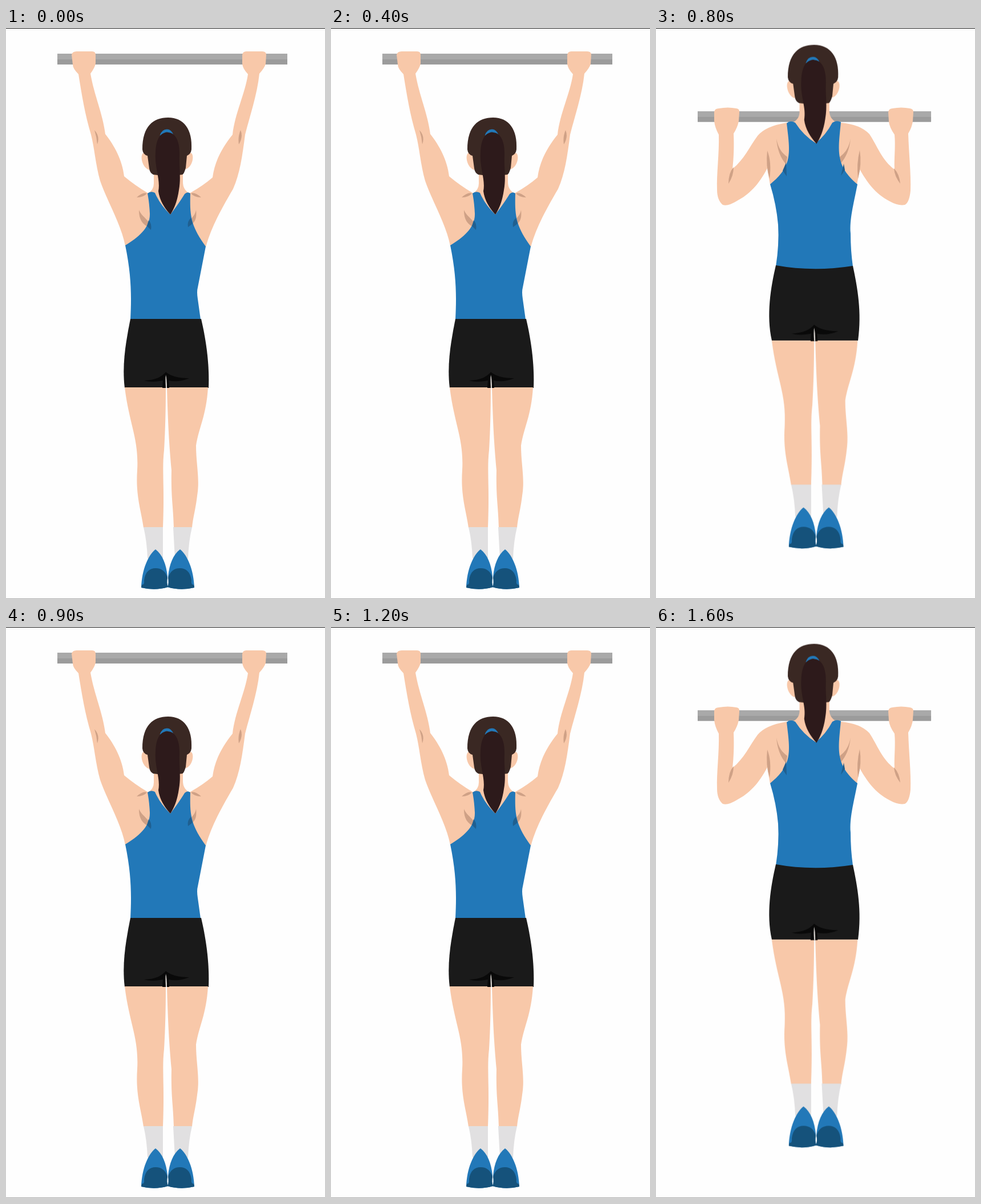
Write an HTML page that moves like this. It is 559x1001 px and loops after 1.7 s.

```html
<!DOCTYPE html>
<html lang="en">
<head>
<meta charset="utf-8">
<title>Pull-up</title>
<style>
  html, body { margin: 0; height: 100%; overflow: hidden; background: #fefefe; }
  svg { display: block; width: 100%; height: 100%; }
  #hang, #pull { filter: blur(.6px); }
  .skin { fill: #f8c8a9; }
  .shade { fill: #cfa186; }
  .blue { fill: #2278b8; }
  .navy { fill: #15527b; }
  .fold { fill: #1f5f90; }
  .shorts { fill: #1a1a1a; }
  .crease { fill: #090909; }
  .sock { fill: #e1e0e1; }
  .hair { fill: #3a2823; }
  .tail { fill: #2d1a1b; }
  .band { fill: none; stroke: #2278b8; stroke-width: 5; }
</style>
</head>
<body>
<svg viewBox="0 0 559 1001">
  <defs>
    <path id="neck" class="skin" d="M259 245H310V270Q310 284 322 290L288 330L248 290Q260 284 259 270Z"/>

    <g id="head">
      <path class="skin" d="M241 219C234 222 238 246 252 249V222ZM324 219C331 222 327 246 313 248V222Z"/>
      <path class="hair" d="M239 213C239 172 258 157 284 157C312 157 327 178 325 213Q324 221 317 224L315 245Q312 256 309 257Q283 261 258 257Q252 254 251 246L248 224Q240 222 239 213Z"/>
      <path class="band" d="M272 189Q275 180 282 180Q288 180 291 188"/>
      <path class="tail" d="M262 218C263 195 270 183 283 183C298 183 305 200 304 225C303 245 307 262 303 284C300 305 294 318 288 327C278 316 269 302 267 286C271 265 260 245 262 218Z"/>
    </g>

    <g id="legs">
      <path class="skin" d="M208 630H280C280 670 279 705 277 740C273 775 278 800 275 876H241C236 842 227 820 230 775C233 720 216 695 208 630Z"/>
      <path class="skin" d="M282 630H354C351 680 338 700 333 732C333 765 340 790 335 820C332 845 328 856 326 876H294C293 835 289 825 290 775C286 730 284 700 282 630Z"/>
      <path class="sock" d="M241 875H275L275 930H248Q247 900 241 875ZM293 875H326Q320 900 319 930H296Z"/>
      <g id="shoe">
        <path class="blue" d="M237 981C238 950 249 924 262 914C274 923 281 940 283 962Q281 973 284 980Q261 987 237 981Z"/>
        <path class="navy" d="M242 968C244 953 252 947 262 947C273 947 280 953 283 964Q281 973 284 980Q261 987 237 981L238 976Q243 977 242 968Z"/>
      </g>
      <use href="#shoe" transform="matrix(-1 0 0 1 567 0)"/>
      <path class="crease" d="M242 618Q269 617 280 603Q293 614 321 614Q302 622 285 618L286 631H274L275 618Q254 622 242 618Z"/>
      <path fill="#ddd8d4" d="M280 608Q282 615 282 631H280Q279 615 280 608Z"/>
    </g>

    <g id="bar">
      <path fill="#a9a9a9" d="M0 0H403V19H0Z"/>
      <path fill="#9b9b9b" d="M0 10H403V19H0Z"/>
    </g>
  </defs>

  <g id="hang">
    <use href="#bar" x="90" y="45"/>
    <path class="skin" d="M115 47Q116 41 124 41H151Q157 41 157 47V62Q156 69 148 80C155 120 169 148 174 186C190 206 204 232 207 260Q226 276 248 289H323Q346 276 362 262C366 232 380 208 397 187C401 150 419 115 424 81Q414 70 414 62V47Q415 41 421 41H449Q456 41 456 47L455 63Q453 70 444 80C440 118 427 155 419 187C414 225 410 255 398 282C376 320 360 348 350 384L209 382C202 345 178 305 165 268C157 240 155 210 149 187C138 150 133 118 127 81Q117 71 117 64Z"/>
    <use href="#neck"/>
    <path class="shade" d="M155 179Q165 190 160 204Q159 191 155 179ZM411 179Q416 191 408 204Q406 191 411 179ZM229 297Q240 287 247 290Q241 297 229 297ZM342 297Q331 287 324 290Q330 297 342 297ZM233 319C239 333 252 335 254 352C242 345 233 340 233 319ZM333 319C331 332 321 333 318 347C330 344 335 336 333 319Z"/>
    <path class="blue" d="M248 290Q254 285 261 289Q270 310 288 327Q304 306 313 291Q318 286 323 290C322 328 323 346 350 383L336 455Q334 462 336 475L341 511H218C220 470 220 435 209 381C232 367 253 350 252 325Q251 305 248 290Z"/>
    <path class="fold" d="M250 337Q256 343 254 354L247 347ZM324 333Q317 339 319 349L327 343Z"/>
    <path class="shorts" d="M218 510H342C349 540 357 585 355 631H208C203 590 210 550 218 510Z"/>
    <use href="#legs"/>
    <use href="#head"/>
  </g>

  <g id="pull">
    <use href="#bar" transform="translate(73 146) scale(1.015 .97)"/>
    <path class="skin" d="M102 147Q103 141 110 141Q126 138 141 141Q147 142 146 148L145 163Q143 174 136 185C137 210 136 230 134 247C154 231 164 208 178 189Q192 172 229 166H324Q358 169 374 186C388 207 396 232 418 248C417 228 420 208 418 187Q409 174 408 164L407 148Q407 142 414 141Q430 138 445 141Q451 142 451 147L450 163Q449 173 442 185C443 220 447 255 446 285Q444 306 436 310Q424 312 410 304C383 290 370 270 357 248L352 275H200L195 246C180 275 163 292 142 303Q126 313 117 310Q107 302 107 283C106 255 111 220 110 187Q103 174 102 163Z"/>
    <use href="#neck" transform="matrix(1.025 0 0 1.02 -14 -130.6)"/>
    <path class="shade" d="M195 215Q203 235 199 264Q192 242 195 215ZM357 214Q361 238 354 264Q351 238 357 214ZM211 194C215 215 224 221 230 226L228 239Q213 222 211 194ZM341 194C337 215 328 221 321 227L323 238Q338 222 341 194ZM136 244Q127 254 127 273Q136 259 136 244ZM417 246Q427 257 428 273Q418 260 417 246Z"/>
    <path class="blue" d="M229 167Q235 161 244 166Q258 188 280 202Q298 187 309 166Q316 161 324 165C319 216 314 241 353 274C346 310 339 335 341 360Q341 390 345 418Q275 428 210 418Q216 380 214 345Q211 310 200 274C240 242 235 218 229 167Z"/>
    <path class="fold" d="M228 236L229 260L222 250ZM329 238L324 259L331 249Z"/>
    <path class="shorts" d="M210 416Q275 428 345 417C353 455 361 498 354 548H203C193 503 201 455 210 416Z"/>
    <use href="#legs" transform="matrix(1.03 0 0 1.03 -11.4 -100.9)"/>
    <use href="#head" transform="matrix(1.025 0 0 1.02 -14 -130.6)"/>
  </g>

  <path fill="#1c1c1c" d="M0 0H559V1H0Z"/>
  <path fill="#a8a8a8" d="M0 1000H559V1001H0Z"/>
</svg>
<script>
  const LOOP = 1700;
  const hang = document.getElementById("hang");
  const pull = document.getElementById("pull");

  // Two reps per loop; the pose switches every 400 ms after a 100 ms lead-in.
  function draw(now) {
    const t = now % LOOP;
    const up = t >= 500 && Math.floor((t - 100) / 400) % 2 === 1;
    hang.style.display = up ? "none" : "";
    pull.style.display = up ? "" : "none";
  }

  const start = performance.now();
  function tick() {
    draw(performance.now() - start);
    requestAnimationFrame(tick);
  }
  tick();
</script>
</body>
</html>
```
